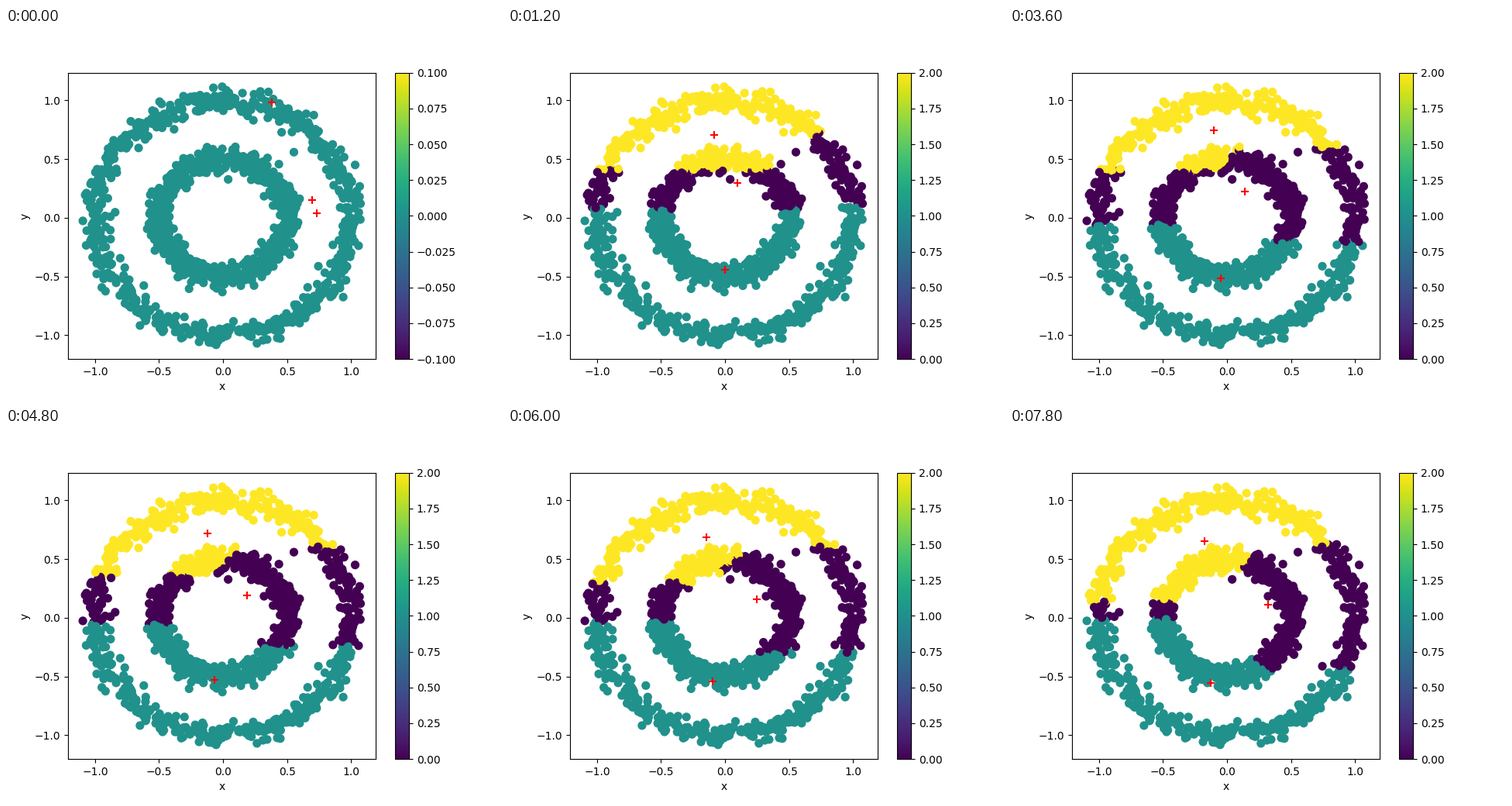
Write a matplotlib script that moves like this. It is 640 by 480 pixels and loops after 8000 ms.

```python
import numpy as np
import matplotlib.pyplot as plt
from matplotlib.animation import FuncAnimation

W, H, DPI = 640, 480, 100
STEP_FRAMES = 3          # each clustering half-step lasts 3 x 200 ms
COUNT, NOISE = 1500, 0.05
XLIM, YLIM = (-1.211, 1.1915), (-1.204, 1.236)

# Key centroid poses: purple, teal, yellow
START = np.array([(0.699, 0.150), (0.735, 0.038), (0.384, 0.982)])
NEAR = np.array([(0.111, 0.243), (-0.034, -0.510), (-0.088, 0.758)])
FAR = np.array([(0.318, 0.111), (-0.125, -0.556), (-0.173, 0.652)])


def make_circles(rng):
    """Two evenly sampled circles in shuffled order, with normal noise."""
    angle = np.linspace(0, 2 * np.pi, COUNT // 2, endpoint=False)
    circle = np.column_stack([np.cos(angle), np.sin(angle)])
    points = np.vstack([circle, 0.5 * circle])
    order = np.arange(COUNT)
    rng.shuffle(order)
    return points[order] + rng.normal(scale=NOISE, size=points.shape)


def assign(points, centers):
    """Index of the nearest center by Manhattan distance."""
    gaps = np.abs(points[:, None] - centers[None]).sum(axis=2)
    return gaps.argmin(axis=1)


def cluster_means(points, groups):
    return np.array([points[groups == k].mean(axis=0) for k in range(3)])


def drift(t):
    """Slow, accelerating glide of the centroids, t from 0 to 1."""
    return NEAR + (FAR - NEAR) * t ** 1.4


points = make_circles(np.random.RandomState(0))
centers = [START, cluster_means(points, assign(points, START))]
centers += [drift(t) for t in np.linspace(0, 1, 5)]
labels = [np.zeros(COUNT)] + [assign(points, c) for c in centers]

fig, ax = plt.subplots(figsize=(W / DPI, H / DPI), dpi=DPI)
dots = ax.scatter(*points.T, c=labels[0], s=50, cmap="viridis",
                  vmin=-0.1, vmax=0.1)
marks = ax.scatter(*START.T, c="red", s=50, marker="+")
fig.colorbar(dots, ax=ax)
ax.set(xlim=XLIM, ylim=YLIM, xlabel="x", ylabel="y")


def update(frame):
    # Even steps move the centroids, odd steps relabel the samples.
    step = frame // STEP_FRAMES
    dots.set_array(labels[(step + 1) // 2])
    dots.set_clim(*((-0.1, 0.1) if step == 0 else (0, 2)))
    marks.set_offsets(centers[step // 2])
    return dots, marks


anim = FuncAnimation(fig, update, frames=40, interval=200,
                     repeat=True, repeat_delay=0, blit=False)
plt.show()
```
